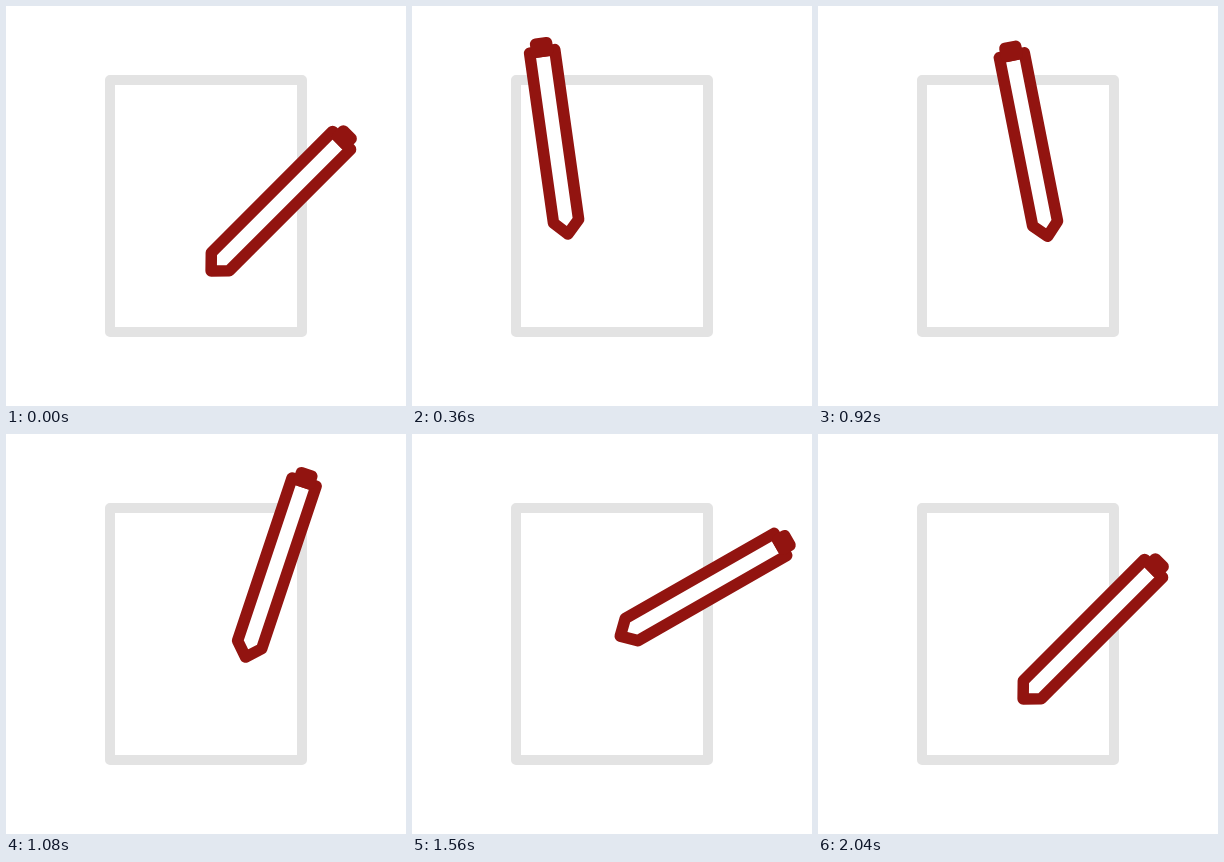
An HTML page with a canvas that plays this animation: 400x400 px, repeating every 2120 ms.

```html
<!DOCTYPE html>
<html lang="en">
<head>
<meta charset="utf-8">
<title>Pen and page</title>
<style>
html, body { margin: 0; width: 100%; height: 100%; overflow: hidden; background: #fff; }
canvas { display: block; width: 400px; height: 400px; }
</style>
</head>
<body>
<canvas id="stage" width="400" height="400"></canvas>
<script>
const ctx = document.getElementById('stage').getContext('2d');
const LOOP = 2120, STEP = 40, LAST = 2040;
const RED = '#921410', GREY = '#e3e3e3';

// Key poses: time in ms, pen centre x and y, tilt in degrees
const rest = [273, 197, 45];
const keys = [
  [0, ...rest],
  [160, 225, 235, 25],
  [360, 142.5, 133, -8],
  [440, 127, 104, -28],
  [560, 121, 118, -60],
  [720, 128, 137, -48.2],
  [1080, 270, 132, 18.5],
  [1400, 281, 124, 59.6],
  [1720, 297, 190, 54.6],
  [1900, 270, 202, 49],
  [LAST, ...rest]
];

// The pen is at rest at both ends of the path
function slope(i, c) {
  const a = keys[i - 1], b = keys[i + 1];
  return a && b ? (b[c] - a[c]) / (b[0] - a[0]) : 0;
}

// Smooth cubic curve through the key poses
function pose(t) {
  let i = 0;
  while (i < keys.length - 2 && t >= keys[i + 1][0]) i++;
  const a = keys[i], b = keys[i + 1];
  const span = b[0] - a[0], u = (t - a[0]) / span, v = 1 - u;
  const ease = u * u * (3 - 2 * u);
  return [1, 2, 3].map(c =>
    a[c] + (b[c] - a[c]) * ease +
    span * u * v * (v * slope(i, c) - u * slope(i + 1, c)));
}

function shape(points, fill) {
  ctx.beginPath();
  points.forEach(([x, y]) => ctx.lineTo(x, y));
  ctx.closePath();
  ctx.fillStyle = fill;
  ctx.fill();
  ctx.stroke();
}

function drawPen(x, y, tilt) {
  const w = 12.7, cap = 5.5, back = -88.5;
  ctx.save();
  ctx.translate(x, y);
  ctx.rotate(tilt * Math.PI / 180);
  ctx.strokeStyle = RED;
  ctx.lineWidth = 11.5;
  shape([[-w, back], [w, back], [w, 83], [0, 96], [-w, 83]], '#fff');
  shape([[-cap, back - 8], [cap, back - 8], [cap, back], [-cap, back]], RED);
  ctx.restore();
}

function draw(t) {
  ctx.fillStyle = '#fff';
  ctx.fillRect(0, 0, 400, 400);
  ctx.lineWidth = 10;
  ctx.lineJoin = 'round';
  ctx.strokeStyle = GREY;
  ctx.strokeRect(104, 74, 192, 252);
  drawPen(...pose(t));
}

const start = performance.now();
function tick() {
  const t = (performance.now() - start) % LOOP;
  draw(Math.min(LAST, Math.floor(t / STEP) * STEP));
  requestAnimationFrame(tick);
}
tick();
</script>
</body>
</html>
```
